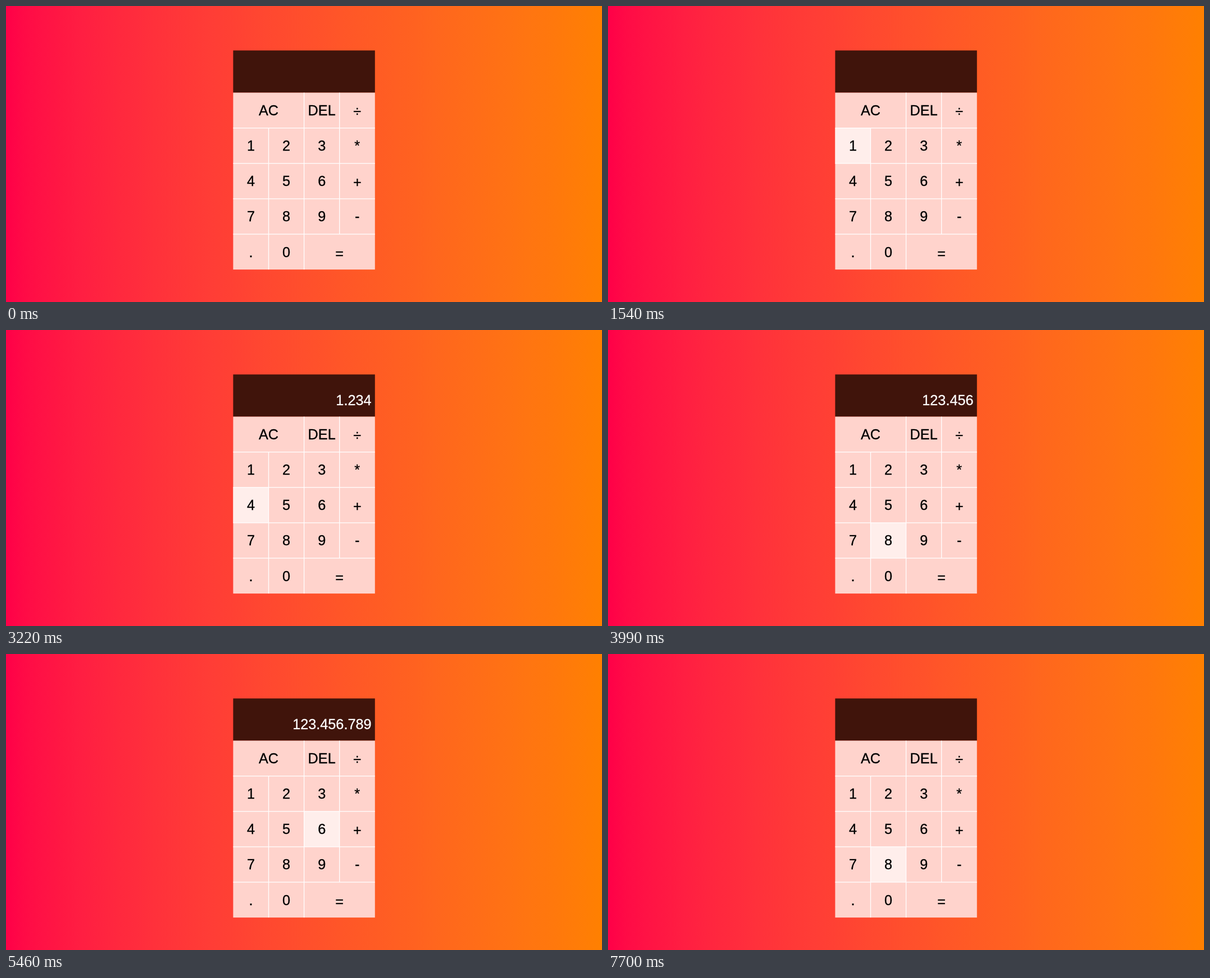
Write an HTML page with a canvas that moves like this. It is 1061x528 px and loops after 8000 ms.

```html
<!DOCTYPE html>
<html lang="en">
<head>
<meta charset="utf-8">
<title>Calculator</title>
<style>
  html, body { margin: 0; width: 100%; height: 100%; overflow: hidden; background: #ff5528; }
  canvas { display: block; }
</style>
</head>
<body>
<canvas id="stage" width="1061" height="528"></canvas>
<script>
const ctx = document.getElementById('stage').getContext('2d');
const LOOP = 8000, TICK = 70;
const W = 1061, H = 528;
const LEFT = 404.4, TOP = 79.3, KEYS_TOP = 154.6, CELL = 63.1;
const WIDTH = CELL * 4, RIGHT = LEFT + WIDTH;
const FONT = '25.24px "Liberation Sans", Arial, sans-serif';

// label, column, row, columns spanned
const keys = [['AC', 0, 0, 2], ['DEL', 2, 0, 1], ['÷', 3, 0, 1]];
['123*', '456+', '789-'].forEach((row, r) =>
  [...row].forEach((label, c) => keys.push([label, c, r + 1, 1])));
keys.push(['.', 0, 4, 1], ['0', 1, 4, 1], ['=', 2, 4, 2]);

// Bursts of evenly spaced steps: a key to hover, "_" for none, "!" to press.
const bursts = [
  [840, 1260, '÷ DEL AC 2'],
  [1540, 2240, '1 ! 2 ! 3'],
  [2590, 2800, '! 2 5 4'],
  [3220, 4200, '! 5 ! 6 ! 8 7'],
  [4480, 4620, '! 8'],
  [4900, 4970, '! 9'],
  [5250, 5460, '! 6'],
  [5530, 5670, '2 _'],
  [5950, 6370, 'AC !'],
  [6930, 7280, 'DEL 3'],
  [7420, 7700, '5 0 8']
];
const events = bursts.flatMap(([start, end, line]) => {
  const steps = line.split(' ');
  return steps.map((step, i) => {
    const time = start + (end - start) * i / (steps.length - 1);
    return { time: Math.floor(time / TICK + 1e-6) * TICK, step };
  });
});

function stateAt(t) {
  let hovered = '_', digits = '';
  for (const { time, step } of events) {
    if (time > t) break;
    if (step !== '!') hovered = step;
    else digits = hovered === 'AC' ? '' : digits + hovered;
  }
  return { hovered, digits: digits.replace(/\B(?=(\d{3})+$)/g, '.') };
}

const sky = ctx.createLinearGradient(0, 0, W, 0);
for (let u = 0; u <= 1; u += 1 / 32) {
  const green = Math.round(128 * u ** 0.7);
  const blue = Math.round(72 * (1 - u) ** 0.7);
  sky.addColorStop(u, `rgb(255,${green},${blue})`);
}

function rect(color, x, y, w, h) {
  ctx.fillStyle = color;
  ctx.fillRect(x, y, w, h);
}

function text(str, x, y, color, align) {
  ctx.font = FONT;
  ctx.textAlign = align;
  ctx.fillStyle = ctx.strokeStyle = color;
  ctx.lineWidth = 0.3;
  ctx.fillText(str, x, y);
  ctx.strokeText(str, x, y);
}

function drawKey([label, col, row, span], hovered) {
  const x = LEFT + col * CELL, y = KEYS_TOP + row * CELL, w = span * CELL;
  if (label === hovered) rect('#ffeeeb', x, y, w, CELL);
  if (col) rect('#fff', x - 0.65, y, 1.3, CELL);
  if (row) rect('#fff', x, y - 0.65, w, 1.3);
  const drop = /[÷+=]/.test(label) ? 2 : 0;
  text(label, x + w / 2, y + CELL / 2 + 9 + drop, '#000', 'center');
}

function draw(t) {
  const { hovered, digits } = stateAt(t);
  rect(sky, 0, 0, W, H);
  rect('#40140b', LEFT, TOP, WIDTH, KEYS_TOP - TOP);
  text(digits, RIGHT - 6.3, 134, '#fff', 'right');
  rect('#ffd3cc', LEFT, KEYS_TOP, WIDTH, CELL * 5);
  keys.forEach(key => drawKey(key, hovered));
}

const origin = performance.now();
function tick() {
  draw((performance.now() - origin) % LOOP);
  requestAnimationFrame(tick);
}
tick();
</script>
</body>
</html>
```
